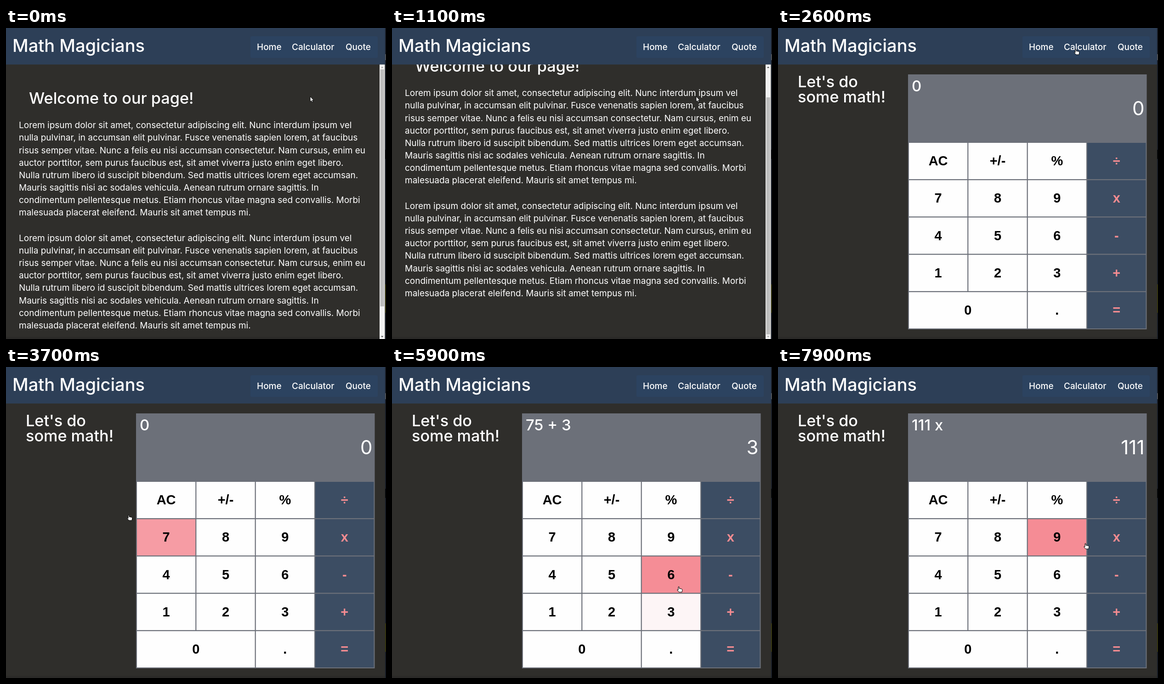
Write an HTML page that moves like this. It is 827 px wide and 677 px high and loops after 8 s.

```html
<!DOCTYPE html>
<html lang="en">
<head>
<meta charset="utf-8">
<title>Math Magicians</title>
<style>
  html, body { margin: 0; width: 100%; height: 100%; overflow: hidden; background: #2f2e2b; }
  svg { display: block; width: 827px; height: 677px; }
  text { font-family: Inter, "Open Sans", sans-serif; fill: #fff; white-space: pre; }
  .title { font-size: 38px; font-weight: 500; }
  .nav { font-size: 19px; font-weight: 500; }
  .head { font-size: 34.2px; font-weight: 500; }
  .body { font-size: 19px; }
  .sum { font-size: 33px; font-weight: 500; }
  .total { font-size: 42px; text-anchor: end; }
  .key { font: bold 29px "Liberation Sans", Arial, sans-serif; text-anchor: middle; fill: #000; }
  .op { fill: #f68c91; }
</style>
</head>
<body>
<svg id="stage" viewBox="0 0 827 677"></svg>
<script>
const LOOP = 8000, STEP = 100, FADE = 300;
const stage = document.getElementById('stage');

function add(parent, tag, attrs, content) {
  const el = document.createElementNS('http://www.w3.org/2000/svg', tag);
  for (const k in attrs) el.setAttribute(k, attrs[k]);
  if (content) el.textContent = content;
  parent.appendChild(el);
  return el;
}
const rect = (p, x, y, width, height, fill, more) => add(p, 'rect', { x, y, width, height, fill, ...more });
const label = (p, cls, x, y, s) => add(p, 'text', { class: cls, x, y }, s);
const path = (p, d, fill, more) => add(p, 'path', { d, fill, ...more });

rect(stage, 0, 0, 827, 677, '#2f2e2b');

// Home page
const home = add(stage, 'g', {});
const article = add(home, 'g', {});
label(article, 'head', 50, 165, 'Welcome to our page!');
const lorem = [
  'Lorem ipsum dolor sit amet, consectetur adipiscing elit. Nunc interdum ipsum vel',
  'nulla pulvinar, in accumsan elit pulvinar. Fusce venenatis sapien lorem, at faucibus',
  'risus semper vitae. Nunc a felis eu nisi accumsan consectetur. Nam cursus, enim eu',
  'auctor porttitor, sem purus faucibus est, sit amet viverra justo enim eget libero.',
  'Nulla rutrum libero id suscipit bibendum. Sed mattis ultrices lorem eget accumsan.',
  'Mauris sagittis nisi ac sodales vehicula. Aenean rutrum ornare sagittis. In',
  'condimentum pellentesque metus. Etiam rhoncus vitae magna sed convallis. Morbi',
  'malesuada placerat eleifend. Mauris sit amet tempus mi.'
];
for (const top of [218.3, 463.8])
  lorem.forEach((line, i) => label(article, 'body', 28, top + i * 27.14, line));

// Calculator page
const calc = add(stage, 'g', {});
label(calc, 'head', 43, 129, "Let's do");
label(calc, 'head', 43, 161.5, 'some math!');
rect(calc, 283, 101, 519.5, 555, '#6c7079');
const sum = label(calc, 'sum', 291, 138);
const total = label(calc, 'total', 797.5, 190);
const rows = ['AC +/- % ÷', '7 8 9 x', '4 5 6 -', '1 2 3 +', '0 . ='];
const keys = {};
rows.forEach((row, r) => {
  let col = 0;
  for (const name of row.split(' ')) {
    const span = name === '0' ? 2 : 1, op = col === 3;
    const x = 285 + 129.4 * col, y = 250 + 81.25 * r, w = 129.4 * span - 2.2;
    const box = rect(calc, x, y, w, 79, '#fff');
    label(calc, op ? 'key op' : 'key', x + w / 2, y + 49, name);
    keys[name] = { box, from: op ? [60, 77, 99] : [254, 254, 254], to: op ? [28, 53, 84] : [245, 139, 148] };
    col += span;
  }
});

// Header, page foot and window edge
rect(stage, 0, 672, 825, 5, '#2b2a28');
rect(stage, 0, 0, 825, 79.5, '#2d3f57');
rect(stage, 532, 18, 277, 47, '#2c4360', { rx: 3 });
label(stage, 'title', 14, 51.5, 'Math Magicians');
label(stage, 'nav', 546, 48, 'Home');
label(stage, 'nav', 622, 48, 'Calculator');
label(stage, 'nav', 739, 48, 'Quote');
rect(stage, 825, 0, 2, 677, '#171c25');
rect(stage, 825, 57, 2, 13, '#4a4d50');
rect(stage, 825, 265, 2, 20, '#05070a');
rect(stage, 825, 558, 2, 62, '#34340f');

// Scrollbar
const bar = add(stage, 'g', {});
rect(bar, 813, 79.5, 11.5, 597.5, '#f1f1f1');
const thumb = rect(bar, 814.5, 90, 8.5, 516, '#bdbdbd');
const up = path(bar, 'M816 87 l2.7 -3 l2.7 3 z', '#a3a3a3');
const down = path(bar, 'M816 670.5 l2.7 3 l2.7 -3 z', '#505050');

// Pointers, tip at the origin
const ink = { stroke: '#000', 'stroke-width': 1, 'stroke-linejoin': 'round' };
const arrow = path(stage, 'M0 0 V11.5 L2.6 9.2 L4.4 13 L6.2 12.1 L4.5 8.4 H7.8 Z', '#fff', ink);
const hand = path(stage,
  'M-1 .6 Q0 -.6 1 .6 V4 L6.5 5.2 Q8 5.6 7.8 7.4 L7 12 H.6 L-3 8 Q-3.6 6.6 -2.4 6.6 L-1 7.6 Z', '#fff', ink);
path(hand.parentNode, '', 'none');

// [time, x, y]
const trail = [
  [1800, 662, 149], [1900, 659, 131], [2000, 659, 131], [2200, 655, 90], [2400, 648, 46], [2800, 648, 46],
  [3100, 520, 160], [3300, 375, 310], [3500, 310, 350], [3700, 267, 322], [3900, 335, 372], [4200, 345, 380],
  [4400, 440, 430], [4500, 510, 450], [4600, 600, 465], [4700, 676, 476], [4900, 676, 489], [5100, 712, 535],
  [5200, 712, 535], [5500, 625, 540], [5600, 625, 540], [5800, 622, 484], [5900, 624, 478], [6100, 624, 478],
  [6300, 668, 545], [6500, 735, 615], [6800, 735, 615], [7000, 735, 545], [7200, 730, 440], [7400, 725, 388],
  [7500, 725, 388], [7600, 695, 388], [7700, 640, 391], [7900, 669, 384]
];
const scrolls = [[800, 0], [900, 14], [1000, 54], [1100, 70], [1500, 70], [1600, 32], [1700, 3], [1800, 3], [1900, 0]];

// [key, enter, leave]
const visits = [
  ['AC', 3200, 3320], ['7', 3320, 3680], ['7', 3760, 4300], ['5', 4350, 4530], ['6', 4530, 4690],
  ['-', 4640, 4950], ['+', 4950, 5350], ['3', 5350, 5700], ['6', 5650, 6220], ['3', 6220, 6320],
  ['=', 6360, 6900], ['+', 6900, 7080], ['-', 7080, 7230], ['x', 7230, 7640], ['9', 7630, 9000]
];
// [time, upper line, lower line]
const entries = [
  [2600, '0', '0'], [4000, '7', '7'], [4500, '75', '75'], [5200, '75 +', '75'], [5700, '75 + 3', '3'],
  [6000, '75 + 36', '36'], [6600, '111', '111'], [7600, '111 x', '111']
];

const clamp = v => Math.min(1, Math.max(0, v));
const ease = v => 1 - Math.pow(1 - clamp(v), 2.3);

function along(list, t) {
  let i = 0;
  while (i < list.length - 1 && list[i + 1][0] <= t) i++;
  const a = list[i], b = list[i + 1] || a;
  const k = b === a ? 0 : clamp((t - a[0]) / (b[0] - a[0]));
  return a.slice(1).map((v, n) => v + (b[n + 1] - v) * k);
}

function hover(name, t) {
  let level = 0;
  for (const [key, enter, leave] of visits)
    if (key === name) level = Math.max(level, ease((t - enter) / FADE) * (1 - ease((t - leave) / FADE)));
  return level;
}

function draw(t) {
  const onCalc = t >= 2600;
  home.style.display = bar.style.display = onCalc ? 'none' : '';
  calc.style.display = onCalc ? '' : 'none';

  if (onCalc) {
    const entry = entries.filter(e => e[0] <= t).pop();
    sum.textContent = entry[1];
    total.textContent = entry[2];
    for (const name in keys) {
      const { box, from, to } = keys[name], k = hover(name, t);
      box.setAttribute('fill', `rgb(${from.map((v, i) => Math.round(v + (to[i] - v) * k))})`);
    }
  } else {
    const [y] = along(scrolls, t);
    article.setAttribute('transform', `translate(0 ${-y})`);
    thumb.setAttribute('y', 90 + y * 61 / 70);
    up.setAttribute('fill', y > 0 ? '#505050' : '#a3a3a3');
    down.setAttribute('fill', y < 70 ? '#505050' : '#a3a3a3');
  }

  const [x, y] = along(trail, t);
  const pointing = t >= 3200 || (t >= 2400 && t < 2900);
  arrow.style.display = pointing ? 'none' : '';
  hand.style.display = pointing ? '' : 'none';
  (pointing ? hand : arrow).setAttribute('transform', `translate(${x} ${y})`);
}

const start = performance.now();
function tick() {
  const t = (performance.now() - start) % LOOP;
  draw(Math.floor(t / STEP) * STEP);
  requestAnimationFrame(tick);
}
tick();
</script>
</body>
</html>
```
